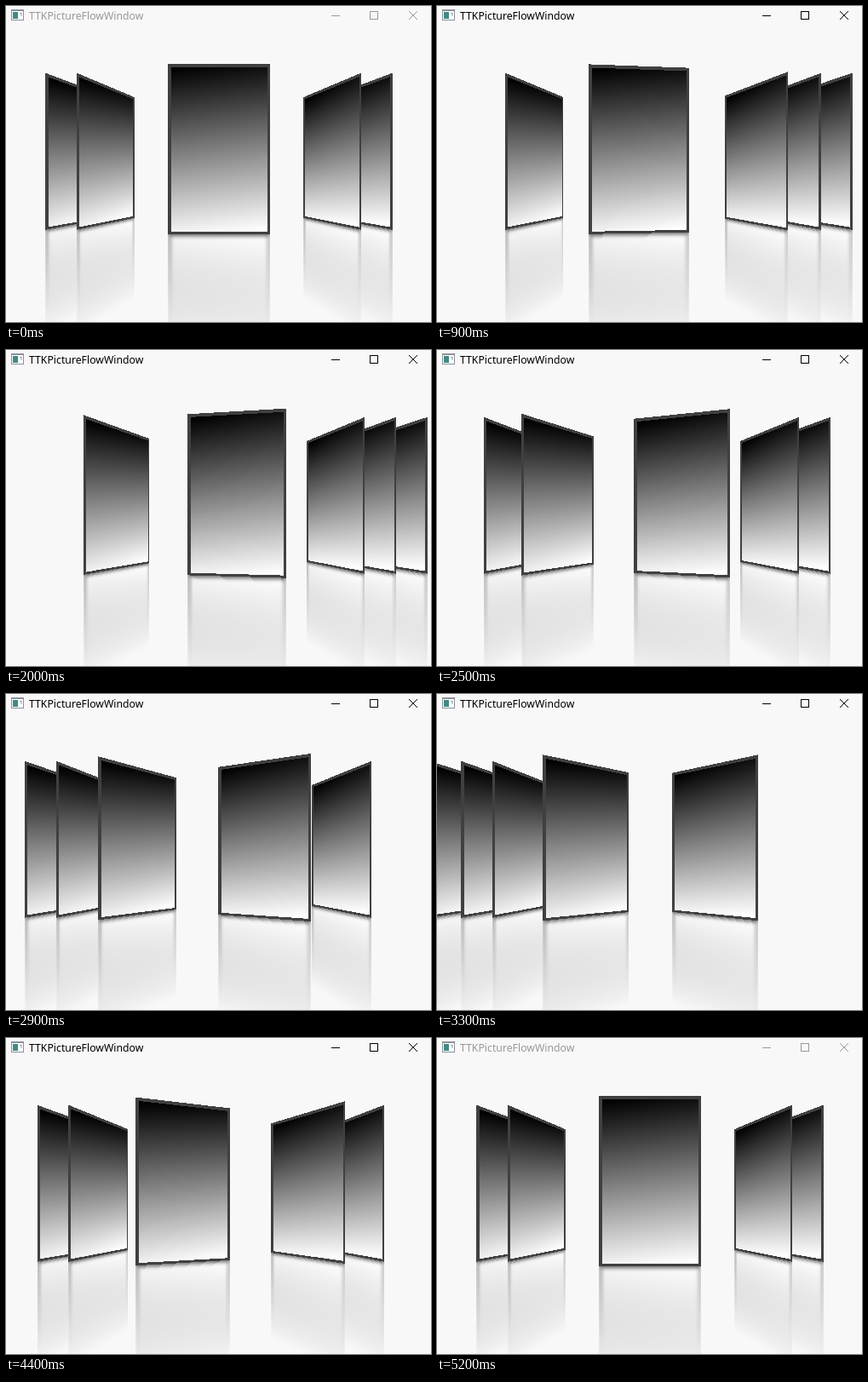
Write an HTML page with a canvas that moves like this. It is 499 by 371 pixels and loops after 5.3 s.

```html
<!DOCTYPE html>
<html lang="en">
<head>
<meta charset="utf-8">
<title>TTKPictureFlowWindow</title>
<style>
  html, body { margin: 0; width: 100%; height: 100%; overflow: hidden; background: #f8f8f8; }
  canvas, svg { position: absolute; left: 0; top: 0; display: block; }
  text { font: 12.25px "Noto Sans", "Open Sans", sans-serif; }
</style>
</head>
<body>
<canvas id="stage" width="499" height="371"></canvas>
<svg width="499" height="371" viewBox="0 0 499 371">
  <g shape-rendering="crispEdges">
    <rect x="6" y="4" width="15" height="13" fill="#8a9296"/>
    <rect x="7" y="6" width="13" height="10" fill="#fff"/>
    <rect x="8" y="7" width="6" height="8" fill="#3f8a86"/>
    <path d="M16 8.5h3M17 10.5h2" stroke="#8a9296"/>
  </g>
  <g id="bar">
    <text x="27" y="16" fill="currentColor">TTKPictureFlowWindow</text>
    <g fill="none" stroke="currentColor">
      <path d="M382 11.5h10"/>
      <rect x="427.5" y="6.5" width="9" height="9"/>
      <path d="M473 6l10 10M483 6l-10 10"/>
    </g>
  </g>
</svg>
<script>
const LOOP = 5300, FRAME = 100, TICK = 30;
const W = 120, H = 200, TEX_H = 360, PAD = 4, FADE = 133;
const TOP = 68, MID_X = 250, MID_Y = 202, DEPTH = 348;
const TILT = 70 * Math.PI / 180, OFFSET_X = 160.7, OFFSET_Z = 86.4, SPACING = 40;
const BG = '#f8f8f8', SLIDES = 5, START = 2;

// [time of the key press, slide to bring to the centre]
const MOVES = [[353, 1], [1005, 0], [1585, 1], [2247, 2],
               [2735, 3], [3210, 4], [3690, 3], [4180, 2]];

function layer(w, h) {
  const c = document.createElement('canvas');
  c.width = w;
  c.height = h;
  return c.getContext('2d');
}

function makePicture() {
  const g = layer(W, H);
  const shade = g.createLinearGradient(W * 0.4, 0, W * 0.6, H);
  shade.addColorStop(0, '#000');
  shade.addColorStop(1, '#fff');
  g.fillStyle = shade;
  g.fillRect(0, 0, W, H);
  // The frame runs one pixel over the right and bottom edges
  g.strokeStyle = '#404040';
  g.lineWidth = 4;
  g.strokeRect(2, 2, W - 3, H - 3);
  return g.canvas;
}

// Picture with its blurred, fading reflection below and a clear strip above
function makeTexture() {
  const picture = makePicture();
  const mix = layer(W, TEX_H);
  mix.fillStyle = BG;
  mix.fillRect(0, 0, W, TEX_H);
  mix.drawImage(picture, 0, 0);
  mix.save();
  mix.globalAlpha = 0.5;
  mix.translate(0, 2 * H);
  mix.scale(1, -1);
  mix.drawImage(picture, 0, 0);
  mix.restore();
  const fade = mix.createLinearGradient(0, H, 0, H + FADE);
  fade.addColorStop(0, 'rgba(248,248,248,0)');
  fade.addColorStop(1, BG);
  mix.fillStyle = fade;
  mix.fillRect(0, H, W, TEX_H - H);

  const out = layer(W, PAD + TEX_H);
  out.translate(0, PAD);
  out.beginPath();
  out.rect(0, 0, W, TEX_H);
  out.clip();
  out.fillStyle = BG;
  out.fillRect(0, 0, W, TEX_H);
  out.filter = 'blur(2px)';
  out.drawImage(mix.canvas, 0, 0);
  out.filter = 'none';
  out.drawImage(picture, 0, 0);
  return out.canvas;
}

// Distance covered in one tick, slowing down close to the goal
const speed = d => 1 / 128 + 0.25 * (1 + Math.sin(Math.PI / 2 * (Math.min(d, 2) - 1)));

function approach(from, to, ticks) {
  let d = Math.abs(to - from);
  for (; ticks > 0 && d > 0; ticks--) d -= speed(d) * Math.min(1, ticks);
  return to + Math.sign(from - to) * Math.max(0, d);
}

function centreAt(time) {
  let pos = START;
  MOVES.forEach(([begin, goal], i) => {
    const end = Math.min(time, i + 1 < MOVES.length ? MOVES[i + 1][0] : LOOP);
    if (end > begin) pos = approach(pos, goal, (end - begin) / TICK);
  });
  return pos;
}

const stage = document.getElementById('stage').getContext('2d');
const bar = document.getElementById('bar');
const texture = makeTexture();
stage.imageSmoothingEnabled = false;

// Perspective view of one slide, column by column
function drawSlide(offset) {
  const near = Math.min(1, Math.abs(offset)), side = Math.sign(offset);
  const cos = Math.cos(TILT * near), sin = Math.sin(TILT * near) * side;
  const cx = side * (OFFSET_X * near + SPACING * Math.max(0, Math.abs(offset) - 1));
  const cz = OFFSET_Z * near;
  for (let x = 0; x < 499; x++) {
    const ray = (x + 0.5 - MID_X) / DEPTH;
    const along = (ray * (DEPTH + cz) - cx) / (cos + ray * sin);
    const col = Math.floor(along + W / 2);
    if (col < 0 || col >= W) continue;
    const scale = DEPTH / (DEPTH + cz - along * sin);
    stage.drawImage(texture, col, 0, 1, PAD + TEX_H,
                    x, MID_Y + (TOP - PAD - MID_Y) * scale, 1, (PAD + TEX_H) * scale);
  }
}

function render(time) {
  const centre = centreAt(time);
  stage.fillStyle = BG;
  stage.fillRect(0, 0, 499, 371);
  Array.from({ length: SLIDES }, (_, i) => i - centre)
    .sort((a, b) => Math.abs(b) - Math.abs(a))
    .forEach(drawSlide);
  bar.style.color = time >= 400 && time < 5200 ? '#000' : '#999';
}

const origin = performance.now();
let shown = -1;
function loop() {
  const time = Math.floor((performance.now() - origin) % LOOP / FRAME) * FRAME;
  if (time !== shown) render(shown = time);
  requestAnimationFrame(loop);
}
loop();
</script>
</body>
</html>
```
